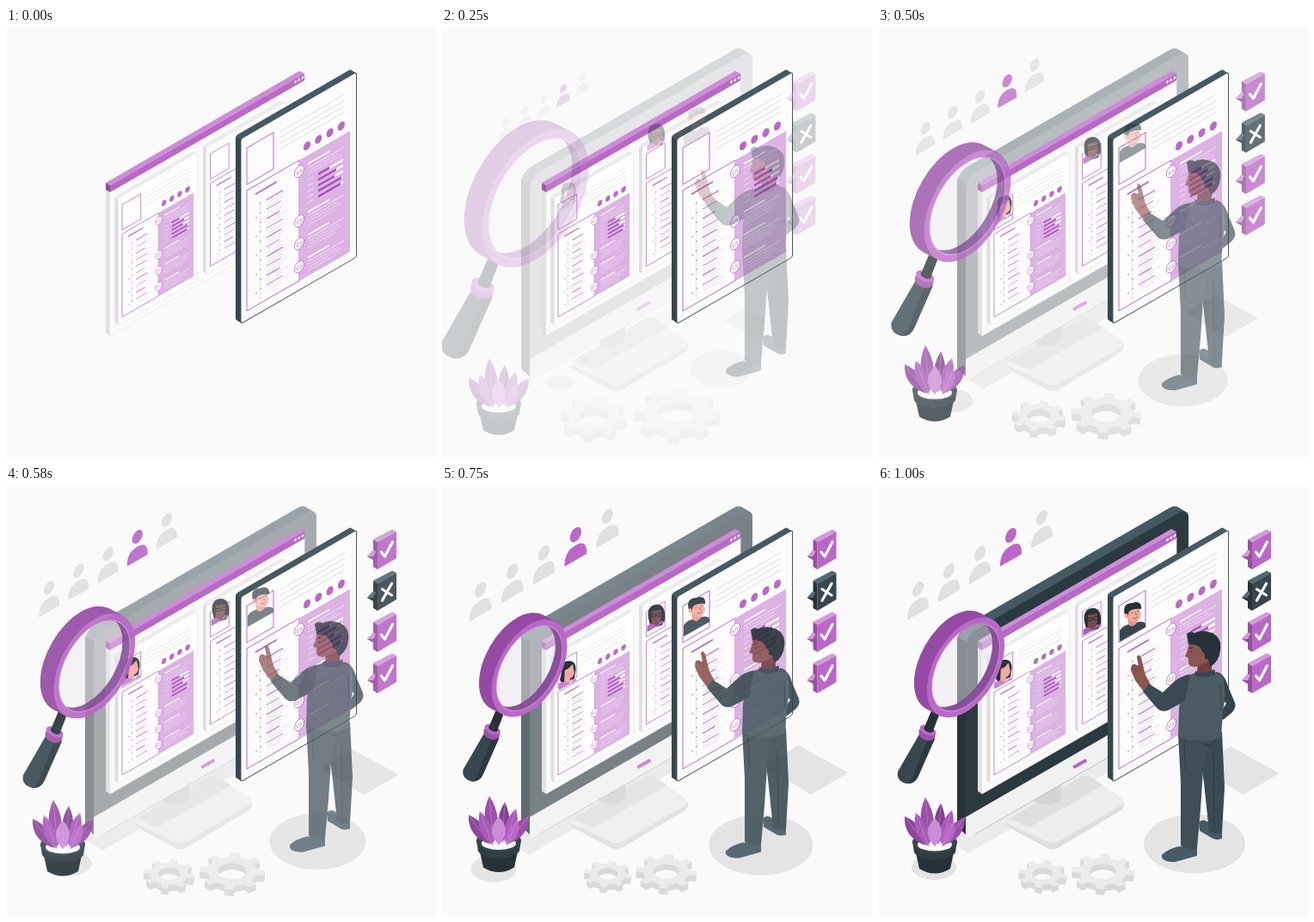
Write an HTML page with a canvas that moves like this. It is 500 px wide and 500 px high and loops after 1040 ms.

```html
<!DOCTYPE html>
<html lang="en">
<head>
<meta charset="utf-8">
<title>Choosing a candidate</title>
<style>
html, body { margin: 0; width: 100%; height: 100%; overflow: hidden; background: #fafafa; }
canvas { display: block; width: 500px; height: 500px; }
</style>
</head>
<body>
<canvas id="stage" width="500" height="500"></canvas>
<script>
const LOOP = 1040, STEP = 1000 / 24, SLOPE = 0.577;
const BG = '#fafafa', PURPLE = '#ba68c8', LILAC = '#dcb3e3', SLATE = '#37474f', INK = '#263238';

const page = document.getElementById('stage').getContext('2d');
const buffer = document.createElement('canvas');
buffer.width = buffer.height = 500;
const off = buffer.getContext('2d');
let g = page;

// Timing
function bezier(x1, y1, x2, y2) {
  const at = (s, a, b) => 3 * (1 - s) * (1 - s) * s * a + 3 * (1 - s) * s * s * b + s * s * s;
  return x => {
    if (x <= 0) return 0;
    if (x >= 1) return 1;
    let lo = 0, hi = 1;
    for (let i = 0; i < 30; i++) {
      const mid = (lo + hi) / 2;
      if (at(mid, x1, x2) < x) lo = mid; else hi = mid;
    }
    return at(lo, y1, y2);
  };
}
const spring = bezier(0.36, -0.01, 0.5, 1.38);
const easeOut = bezier(0, 0, 0.58, 1);
const easeInOut = bezier(0.42, 0, 0.58, 1);

function mix(color, amount) {
  const part = (c, i) => parseInt(c.slice(1 + 2 * i, 3 + 2 * i), 16);
  const rgb = [0, 1, 2].map(i => Math.round(part(BG, i) + (part(color, i) - part(BG, i)) * amount));
  return `rgb(${rgb})`;
}

// Drawing helpers
const shift = (x, y) => [1, 0, 0, 1, x, y];
const zoom = (s, x, y) => [s, 0, 0, s, x * (1 - s), y * (1 - s)];

function layer(alpha, matrix, draw) {
  if (alpha <= 0) return;
  g = off;
  g.setTransform(1, 0, 0, 1, 0, 0);
  g.clearRect(0, 0, 500, 500);
  g.setTransform(...matrix);
  draw();
  g = page;
  g.globalAlpha = Math.min(1, alpha);
  g.drawImage(buffer, 0, 0);
  g.globalAlpha = 1;
}

function plane(x, y, s, draw) {
  g.save();
  g.transform(s, -SLOPE * s, 0, s, x, y);
  draw();
  g.restore();
}

function fill(color, d) {
  g.fillStyle = color;
  g.fill(new Path2D(d));
}

function stroke(color, width, d) {
  g.strokeStyle = color;
  g.lineWidth = width;
  g.lineCap = g.lineJoin = 'round';
  g.stroke(new Path2D(d));
}

function oval(color, x, y, rx, ry, turn = 0) {
  g.beginPath();
  g.ellipse(x, y, rx, ry, turn, 0, 7);
  g.fillStyle = color;
  g.fill();
}

const disc = (color, x, y, r) => plane(x, y, 1, () => oval(color, 0, 0, 0.866 * r, r));

function box(w, h, r) {
  g.beginPath();
  g.roundRect(0, 0, w, h, r);
}

// Upright slab; (dx, dy) leads from the back face to the front face
function slab(x, y, w, h, r, dx, dy, side, top, front) {
  for (let i = 0; i <= dx; i += 0.5) {
    const k = 1 - i / dx;
    plane(x - dx * k, y - dy * k, 1, () => { box(w, h, r); g.fillStyle = top; g.fill(); });
  }
  const y1 = y + r * 0.6, y2 = y + h - r * 0.4;
  fill(side, `M${x + 1} ${y1}V${y2}L${x - dx} ${y2 - dy - r * 0.4}V${y1 - dy}Z`);
  plane(x, y, 1, () => { box(w, h, r); g.fillStyle = front; g.fill(); });
}

// Resume sheet
function rule(u, v, len, color, width) {
  g.fillStyle = color;
  g.fillRect(u, v - width / 2, len, width);
}

function paragraph(u, v, len, color, rows) {
  for (let i = 0; i < rows; i++) rule(u, v + i * 3.6, len - (i * 7) % 11, color, 0.8);
}

function resume(x, y, s) {
  plane(x, y, s, () => {
    g.strokeStyle = PURPLE;
    g.lineWidth = 1;
    g.strokeRect(7, 14.5, 31, 42.5);
    for (let i = 0; i < 4; i++) {
      rule(45, 18 + i * 6.7, 76, '#dedede', 1);
      oval(PURPLE, 77 + i * 13.3, 52.5, 4, 4.7);
    }
    g.strokeRect(7, 64, 61, 140);
    g.fillStyle = LILAC;
    g.fillRect(68, 64, 59, 140.5);

    rule(17, 74, 25, PURPLE, 2);
    g.fillStyle = '#d4d4d4';
    g.fillRect(22.5, 86, 0.6, 113);
    for (let i = 0; i < 10; i++) {
      const v = 88 + i * 11;
      rule(22, v, 1.6, '#999', 1.4);
      if (i % 2) rule(17, v + 3, 2.5, '#aaa', 1.2);
      rule(30, v, 19 - (i % 3) * 2, i % 2 ? LILAC : '#cf93d9', 1.9);
      paragraph(30, v + 3.6, 25, '#e2e2e2', 2);
    }

    rule(78, 74, 25, '#fff', 1.8);
    paragraph(78, 79, 42, '#f1e0f4', 3);
    [13, 21, 19, 27, 26].forEach((len, i) => {
      const v = 93 + i * 6.5;
      rule(78, v, 7, '#f1e0f4', 0.9);
      rule(90, v, 29, '#fff', 2.9);
      rule(90, v, len, '#a94fba', 2.9);
    });
    for (let i = 0; i < 3; i++) {
      const v = 130 + i * 26.5;
      rule(78, v, 25, '#fff', 1.8);
      paragraph(78, v + 4.5, 42, '#f3e4f5', 4);
    }
    for (const v of [77, 134.5, 161, 188]) {
      oval('#fff', 68, v, 5.6, 6.5);
      g.strokeStyle = PURPLE;
      g.lineWidth = 0.7;
      g.stroke();
      g.lineWidth = 0.5;
      g.strokeRect(65.5, v - 1, 5, 3);
    }
  });
}

function smallSheet(x, y) {
  slab(x, y, 92, 148, 2, 4, 2.3, '#dfdfdf', '#ececec', '#fff');
  plane(x, y, 1, () => { box(92, 148, 2); g.strokeStyle = '#ececec'; g.lineWidth = 0.7; g.stroke(); });
  resume(x, y, 0.69);
}

function bigSheet() {
  slab(273, 129, 134.5, 215, 2.5, 6, 3.8, SLATE, '#455a64', '#fcfcfc');
  plane(273, 129, 1, () => { box(134.5, 215, 2.5); g.strokeStyle = SLATE; g.lineWidth = 0.9; g.stroke(); });
  resume(273, 129, 1);
}

function browser() {
  fill('#e2e2e2', 'M116 187L121 190V358L116 355Z');
  fill(BG, 'M121 190L347 60V228L121 358Z');
  stroke('#ebebeb', 0.8, 'M347 60V228L121 358');
  fill('#cb8ed6', 'M116 180L341 50L347 53L121 183Z');
  fill('#96489f', 'M116 180L121 183V191L116 188Z');
  fill(PURPLE, 'M121 183L347 53V61L121 191Z');
  for (let i = 0; i < 3; i++) disc('#fff', 336.5 + i * 4.2, 62.7 - i * 2.4, 1.6);
}

function monitor(t) {
  const rim = t ** 1.2, face = t ** 1.7, base = t ** 0.7;
  const pale = c => mix(c, base);
  // stand
  fill(pale('#dedede'), 'M152 388L236 341Q241 338 246 341L283 363Q289 370 283 377L209 421Q203 424 197 421L152 397Q148 392 152 388Z');
  fill(pale('#ededed'), 'M152 387L236 338Q241 335 246 338L282 362Q288 367 283 371L209 414Q203 417 197 414L152 393Q148 390 152 387Z');
  fill(pale('#dfdfdf'), 'M152 387L236 338Q241 335 246 338L262 348L176 397Z');
  fill(pale('#d4d4d4'), 'M182 330H213V364Q198 376 182 366Z');
  // screen
  slab(102, 174, 259, 237, 12, 10, 6, mix(INK, rim), mix('#455a64', rim), mix('#2b3940', face));
  plane(102, 174, 1, () => {
    g.fillStyle = pale('#f1f1f1');
    g.beginPath();
    g.roundRect(0, 211, 259, 26, [0, 0, 12, 3]);
    g.fill();
  });
  stroke(mix(PURPLE, t), 4, 'M228.500 326.500L241 319.500');
}

// Pieces that appear
function shadows() {
  const c = '#e4e4e4';
  oval(c, 368, 416, 59, 34.5);
  oval(c, 65, 443, 26, 15);
  fill(c, 'M372 327L410 303L467 334L425 359Z');
  fill('#ebebeb', 'M80 412L105 427L290 320L262 305Z');
}

function contacts() {
  for (let i = 0; i < 5; i++) {
    const color = i === 3 ? PURPLE : '#e0e0e0';
    plane(46.5 + i * 36, 148.8 - i * 20.8, 1, () => {
      oval(color, 0, -29, 6.5, 7.8);
      fill(color, 'M-12.500 0C-13 -11 -9 -17 0 -17S13 -11 12.500 0Z');
    });
  }
}

function checks() {
  for (let i = 0; i < 4; i++) {
    const cross = i === 1;
    const [front, side, top] = cross ? [SLATE, INK, '#546972'] : [PURPLE, '#96509f', '#d19bd9'];
    g.save();
    g.translate(0, i * 48);
    fill(side, 'M430 62L435 65V97L430 94V86L423 82L430 75Z');
    fill(top, 'M430 62L452 50.500L457 53L435 65.500Z');
    fill(top, 'M423 82L430 74L433 76L430 82Z');
    fill(front, 'M435 65.500L457 53V84L435 97Z');
    stroke('#fff', 3.2, cross ? 'M440.500 72L451.500 79M451.500 65.500L440.500 85' : 'M439.500 77L443.500 82L452.500 65');
    g.restore();
  }
}

function gear(x, y, r, turn) {
  const teeth = 8, half = Math.PI / teeth;
  const body = new Path2D();
  for (let i = 0; i < teeth; i++) {
    const a = 2 * half * i + turn;
    [[-0.85, 0.76], [-0.48, 0.78], [-0.36, 1], [0.36, 1], [0.48, 0.78], [0.85, 0.76]].forEach(([d, k]) => {
      body.lineTo(Math.cos(a + d * half) * r * k, Math.sin(a + d * half) * r * k);
    });
  }
  body.closePath();
  body.moveTo(r * 0.43, 0);
  body.arc(0, 0, r * 0.43, 0, 7);
  for (let z = 7; z >= 0; z -= 0.5) {
    g.save();
    g.translate(x, y + z);
    g.scale(1, SLOPE);
    g.fillStyle = z ? '#d9d9d9' : '#ebebeb';
    g.fill(body, 'evenodd');
    g.restore();
  }
}

function leaf(x, y, tipX, tipY, width, color) {
  const mx = x + (tipX - x) * 0.6, my = y + (tipY - y) * 0.5;
  const len = Math.hypot(tipX - x, tipY - y);
  const nx = -(tipY - y) / len * width, ny = (tipX - x) / len * width;
  fill(color, `M${x} ${y}Q${mx + nx} ${my + ny} ${tipX} ${tipY}Q${mx - nx} ${my - ny} ${x} ${y}Z`);
  stroke('#cf98d9', 0.5, `M${x} ${y}L${tipX} ${tipY}`);
}

function plant() {
  fill(INK, 'M43 422H89L84 445Q66 456 48 445Z');
  fill('#2f3e45', 'M40 413H92L90 426Q84 434 66 434.500Q47 434 42 426Z');
  oval(SLATE, 66, 414, 26, 12.5);
  oval('#fff', 66, 417, 20, 7.5);
  leaf(60, 416, 55, 362, 15, '#9a4fa9');
  leaf(70, 416, 73, 369, 13, '#81418f');
  leaf(73, 416, 86, 377, 13, '#a95bb8');
  leaf(56, 418, 31, 384, 14, '#8c479b');
  leaf(75, 418, 101, 385, 14, '#9a4fa9');
  leaf(59, 419, 44, 380, 13, '#a95bb8');
  leaf(75, 419, 88, 390, 12, PURPLE);
  leaf(66, 419, 66, 386, 16, '#cb8cd6');
}

const SKIN = '#f3a9a0';

function portraitA() {
  fill(INK, 'M139 216C138 207 141 202 147 202C154 201 157 207 155 216L154 222L140 229L137 224Z');
  fill(SKIN, 'M143 209L152 206L154 216Q152 222 149 222V229L142 228Z');
  fill(INK, 'M141 213Q148 212 151 206L145 203L140 208Z');
  fill('#c77fd3', 'M135.500 236V228L142 226L149 228L154 222L156.500 224.500Z');
}

function portraitB() {
  fill(INK, 'M240 158C238 147 243 142 250 142C258 142 260 150 259 160L256 166L243 170Z');
  fill('#7a4a48', 'M244 150L255 148V158Q252 164 250 164V168L244 168Z');
  stroke(INK, 1, 'M244 154L249 153V156L245 157ZM251 153L256 151V155L252 156Z');
  fill('#a95cb8', 'M238.500 174V167L244 164L249 167L254 161L259.500 162Z');
}

function portraitC() {
  fill(SLATE, 'M281 181V168Q284 163 291 161L303 158Q309 157 311 160V164Z');
  fill('#e8958e', 'M290 153L301 152V159Q296 166 291 161Z');
  fill(SKIN, 'M288 144L303 138L306 150Q304 158 299 158Q291 158 289 152Z');
  fill(INK, 'M287 150C284 140 289 136 296 136C303 133 307 137 306 143Q297 142 292 146L290 152Z');
  oval(SKIN, 288.5, 151, 2, 2.8);
  stroke('#693e40', 0.8, 'M295 147V148M302 145V146M297 154Q300 155 302 152M299 147L301 150');
}

function man() {
  const brown = '#8b5550', dark = '#70413f', shoe = '#455a64';
  // feet and legs
  fill(shoe, 'M373 391Q378 386 384 391L400 402V410Q392 413 386 408L374 401Z');
  fill('#3a4a52', 'M372 296L379 345L385 402Q393 406 400 403L403 350L400 286Z');
  fill(shoe, 'M330 429Q337 422 350 419L371 421V430L346 437Q333 438 330 432Z');
  fill('#3f4f57', 'M349 288L352 345L352 418Q361 425 371 421L375 376L378 330L384 300L398 290Z');
  stroke('#2b383f', 0.8, 'M378 300Q385 304 391 297M356 296L357 330M390 310L391 398');
  // far arm
  fill('#33434b', 'M393 216Q403 218 407 233L415 252Q417 258 411 264L401 272L397 265L405 253L394 240Z');
  // torso
  fill('#4a5b63', 'M356 222L372 216H389L401 221Q406 242 401 262L399 293Q375 300 349 292L350 258Z');
  stroke('#303f47', 0.9, 'M398 232L399 261');
  // pointing arm
  fill(brown, 'M309 239L299 226L294 214Q294 207 298 207L303 209L301 199Q303 194 306 200L309 212L311 220L317 231Z');
  stroke(dark, 0.8, 'M303 209L304 215M298 208L300 215');
  fill('#3a4a52', 'M363 219Q351 221 344 228L331 240L315 230L308 239L325 259Q329 263 337 261L357 250Z');
  // head
  fill(dark, 'M372 206L388 200V216Q378 221 371 216Z');
  fill(SLATE, 'M369 215Q379 220 391 213L393 219Q380 225 368 220Z');
  fill(brown, 'M362 181L360 191L357 198L361 200L361 207Q364 211 371 210L384 204L384 181Z');
  fill(INK, 'M361 184L359 172Q363 168 368 171Q376 166 389 171Q400 177 398 191Q397 203 387 210L384 202L379 200L376 190Q372 183 361 184Z');
  oval(brown, 377, 198, 3, 4.5);
  stroke(INK, 1, 'M362 189L366 188M364 192V193');
}

function magnifier() {
  const cx = 102, cy = 211;
  // handle
  fill(INK, 'M62 262L71 266L63 287L53 283Z');
  fill(SLATE, 'M49 287L66 294L47 337Q43 347 33 346Q21 343 23 332Z');
  fill('#2b393f', 'M59 291L66 294L47 337Q43 347 33 346Q40 343 42 334Z');
  fill('#9c50ab', 'M48 283L67 288L66 293Q61 299 52 294Q46 291 48 283Z');
  oval(PURPLE, 58, 284, 10, 5.5, 0.4);
  oval(INK, 59, 283, 6, 3.2, 0.4);
  fill(INK, 'M62 262L71 266L64 284L54 281Z');
  // rim
  for (let i = 15; i > 0; i -= 0.5) disc('#954aa4', cx - i, cy - i * 0.53, 52);
  disc(PURPLE, cx, cy, 52);
  disc('#cf95d9', cx, cy, 46);
  // opening with glass
  plane(cx, cy, 1, () => {
    g.beginPath();
    g.ellipse(0, 0, 39, 45, 0, 0, 7);
    g.save();
    g.clip();
    oval('#87509a', 0, 0, 45, 52);
    g.globalCompositeOperation = 'destination-out';
    oval('#000', -8, -9, 39, 45);
    g.globalCompositeOperation = 'source-over';
    oval('rgba(236,232,238,0.5)', -8, -9, 39, 45);
    g.restore();
  });
}

function render(t) {
  const e = spring(t), grow = 0.5 + 0.5 * e, shrink = 1.5 - 0.5 * e, slide = 30 * (1 - e);
  const o = easeOut(t), late = easeInOut(t);
  g.fillStyle = BG;
  g.fillRect(0, 0, 500, 500);
  layer(e, zoom(grow, 255, 363), shadows);
  layer(e, zoom(grow, 118.5, 91.5), contacts);
  if (t > 0) monitor(t);
  browser();
  smallSheet(130.5, 198);
  smallSheet(233, 139);
  layer(e, shift(0, -slide), portraitA);
  layer(o, shift(0, -50 * (1 - o)), portraitB);
  bigSheet();
  layer(late, shift(0, -50 * (1 - late)), portraitC);
  layer(e, shift(-slide, 0), checks);
  layer(e, zoom(shrink, 230.5, 451.7), () => {
    gear(191.5, 451, 28, 0.2);
    gear(261.5, 448, 36, 0.1);
  });
  layer(e, shift(0, slide), plant);
  layer(o ** 1.3, shift(0, -52 * (1 - o)), man);
  layer(e, zoom(shrink, 85, 245), magnifier);
}

let shown = -1;
const start = performance.now();
function tick() {
  const ms = (performance.now() - start) % LOOP;
  const step = Math.min(24, Math.floor((ms + 5) / STEP));
  if (step !== shown) {
    shown = step;
    render(step ? Math.min(1, step / 24 + 0.01) : 0);
  }
  requestAnimationFrame(tick);
}
tick();
</script>
</body>
</html>
```
